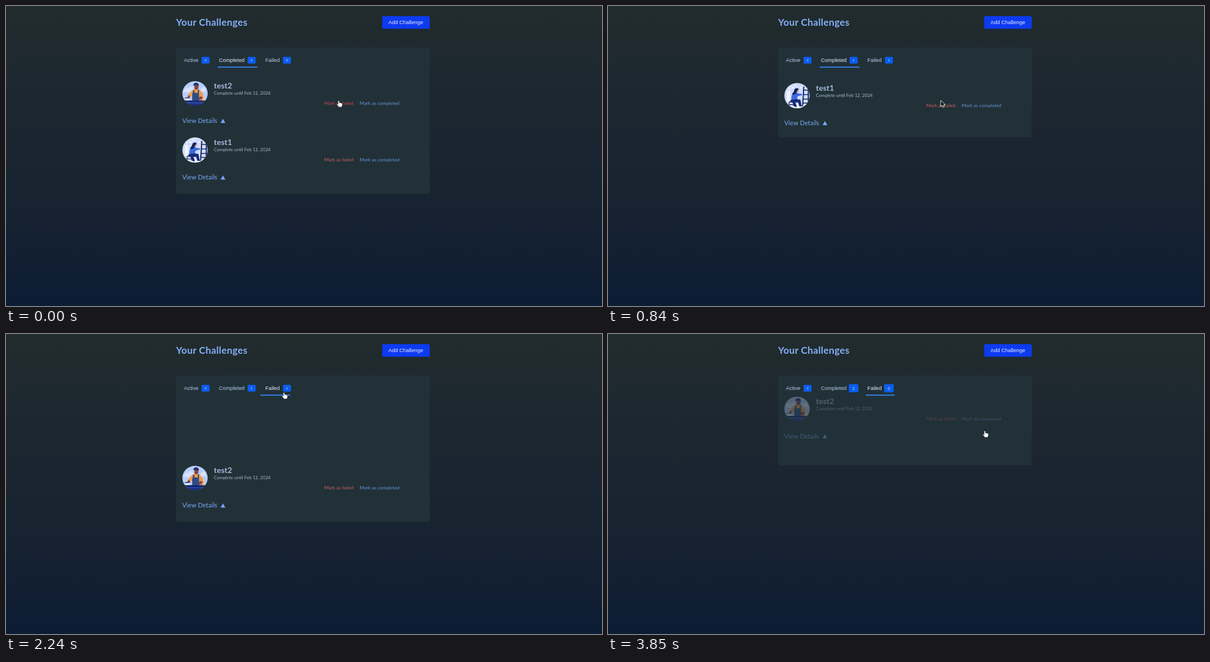
An HTML page that plays this animation: 1055 px wide and 531 px high, repeating every 3.92 s.

```html
<!DOCTYPE html>
<html lang="en">
<head>
<meta charset="utf-8">
<title>Challenges</title>
<style>
  html, body { margin: 0; width: 100%; height: 100%; overflow: hidden; background: #182331; }
  svg { display: block; width: 100vw; height: 100vh; }
  text { font-family: Lato, sans-serif; }
  .ui { font-family: "Liberation Sans", Arial, sans-serif; font-size: 9.4px; fill: #b7cdf0; }
  .num { font-family: "Liberation Sans", Arial, sans-serif; font-size: 6.2px; fill: #cfe0ff; text-anchor: middle; }
  .title { font-size: 17px; font-weight: 700; letter-spacing: .4px; fill: #84b0f8; }
  .name { font-size: 14.06px; font-weight: 700; fill: #a5bad9; }
  .date { font-size: 8px; fill: #a9bace; }
  .link { font-size: 8.44px; }
  .more { font-size: 11.25px; fill: #79a7f8; }
</style>
</head>
<body>
<svg viewBox="0 0 1055 531" preserveAspectRatio="none">
  <defs>
    <linearGradient id="sky" x1="0" y1="0" x2="0" y2="1">
      <stop offset="0" stop-color="#222c2d"/>
      <stop offset=".3" stop-color="#1c2731"/>
      <stop offset=".65" stop-color="#182331"/>
      <stop offset="1" stop-color="#0c1c34"/>
    </linearGradient>
    <clipPath id="disc"><circle r="22.4"/></clipPath>
    <clipPath id="dish"><path d="M-22.4 0A22.4 21.6 0 0 1 22.4 0A22.4 21.4 0 0 1 -22.4 0Z"/></clipPath>

    <g id="cook" clip-path="url(#dish)">
      <rect x="-23" y="-23" width="46" height="46" fill="#b9cef8"/>
      <path d="M-20 -5q3 -6 8 -4q4 -6 9 -1v8h-17zM10 -8q4 -5 9 -1v6h-9z" fill="#d6e3fd"/>
      <path d="M-5 -6Q2 -9 8 -6Q13 -3 15 5L14 11H-5L-6 4L-10 7L-13 4Z" fill="#f29a45"/>
      <path d="M-11 3L-8 6L-13 11L-16 9Z" fill="#8a4538"/>
      <path d="M9 5L14 7L10 12L4 11Z" fill="#8a4538"/>
      <path d="M-3 -6H-1V-1H5V-7H7V13H-5V2Z" fill="#2d4c8b"/>
      <path d="M-1 -8V-14H6V-9Q3 -5 -1 -8Z" fill="#864237"/>
      <path d="M-3 -14Q-3 -19 2 -19Q7 -19 7 -13L5 -14Z" fill="#20336f"/>
      <path d="M-18 7H-8Q-9 13 -13 13Q-17 13 -18 7Z" fill="#e9f0ff"/>
      <path d="M-18 8H-9" stroke="#263b82" stroke-width="1.6"/>
      <path d="M-23 12.5H23V16H-23Z" fill="#17246b"/>
      <path d="M-23 16H23V22H-23Z" fill="#2448a6"/>
      <path d="M-23 18H23V22H-23Z" fill="#1a2c7c"/>
      <circle cx="11" cy="11" r="1.8" fill="#e6604f"/>
      <circle cx="15" cy="11" r="1.6" fill="#f2c45b"/>
    </g>

    <g id="painter" clip-path="url(#disc)">
      <rect x="-23" y="-23" width="46" height="46" fill="#cfddfc"/>
      <path d="M-18 -9H-12V10H-18ZM-23 15H23V23H-23Z" fill="#f1f5ff"/>
      <g fill="#fff">
        <circle cx="-8" cy="-14" r="1.8"/><circle cx="-3" cy="-18" r="1.2"/>
        <circle cx="7" cy="-14" r="1.3"/><circle cx="-14" cy="-13" r="1.2"/>
      </g>
      <g stroke="#14235d" fill="none">
        <path d="M12 -16L10 18M20 -18L20 18" stroke-width="2"/>
        <path d="M11 -10H21M11 -2H21M10 6H21M10 13H21" stroke-width="1.5"/>
        <path d="M-13 10L-16 21M-4 10L-2 21M-14 16H-3" stroke-width="1.4"/>
      </g>
      <path d="M-7 -5Q-2 -9 2 -4L9 -3V-1L1 1L0 9H-10Q-11 1 -7 -5Z" fill="#3f6add"/>
      <path d="M-12 8Q-3 5 6 7L8 17L11 19H4L2 12L-3 12L0 19H-6L-8 12H-12Z" fill="#192b78"/>
      <circle cx="1" cy="-9" r="3.2" fill="#e5b9ae"/>
      <path d="M3 -12Q0 -15 -4 -12Q-5 -7 -9 -3Q-5 0 -2 -4Q0 -8 3 -12Z" fill="#14235d"/>
    </g>
  </defs>

  <rect width="1055" height="531" fill="url(#sky)"/>
  <text class="title" x="301" y="35">Your Challenges</text>
  <rect x="666" y="18" width="84" height="22.3" rx="2" fill="#0c3bf0"/>
  <text class="ui" x="677" y="32.2" style="fill:#e8eeff">Add Challenge</text>

  <rect id="panel" x="301" y="73" width="449" height="259.5" rx="4" fill="#213137"/>
  <g id="tabs"></g>
  <rect id="bar" y="107.2" height="2" fill="#367fe6"/>
  <g id="cards"></g>

  <g id="arrow" stroke="#fff" stroke-width=".9" stroke-linejoin="round">
    <path d="M0 0V11.2L2.6 8.8L4.3 12.5L6.2 11.7L4.6 8H8Z" fill="#080a0c"/>
  </g>
  <g id="hand" stroke="#15191c" stroke-width=".7" stroke-linejoin="round">
    <path d="M-1.2 .9Q0 -.6 1.2 .9V4.3Q2.4 3.4 3.2 4.6Q4.4 3.9 5 5.2Q6.4 4.8 6.5 6.4V8.2Q6.4 9.8 5.5 10.6V12H-.6V11L-3.4 7.4Q-4 5.9 -2.5 6.1L-1.2 7.2Z" fill="#fff"/>
  </g>
</svg>

<script>
const LOOP = 3920, STEP = 70, UNIT = 0.7033, ROW = 100.2;
const $ = id => document.getElementById(id);
const clamp = v => Math.max(0, Math.min(1, v));
const mix = (a, b, k) => a + (b - a) * k;

// Cubic bezier easing, solved by bisection.
function bezier(x1, y1, x2, y2) {
  const at = (a, b, u) => 3 * (1 - u) * (1 - u) * u * a + 3 * (1 - u) * u * u * b + u * u * u;
  return x => {
    if (x <= 0) return 0;
    if (x >= 1) return 1;
    let lo = 0, hi = 1;
    for (let i = 0; i < 24; i++) {
      const mid = (lo + hi) / 2;
      if (at(x1, x2, mid) < x) lo = mid; else hi = mid;
    }
    return at(y1, y2, lo);
  };
}
const shiftEase = bezier(.4, 0, .1, 1);
const fadeEase = bezier(.25, .1, .35, 1);

// Underdamped spring, stiffness 500 and damping 25.
function spring(ms) {
  if (ms <= 0) return 0;
  const s = ms / 1000, w = Math.sqrt(500 - 12.5 * 12.5);
  return 1 - Math.exp(-12.5 * s) * (Math.cos(w * s) + 12.5 / w * Math.sin(w * s));
}
const fade = ms => fadeEase(ms / 300);
const shift = ms => shiftEase(ms / 450);
const lift = -30 * UNIT;

const LEAVE1 = 150, DROP1 = 514;
const SWITCH = 1952, DROP2 = 2293;
const LEAVE3 = 3722;
const COUNT1 = 60, COUNT2 = 3632;

const tabs = [["Active", 315, 353.2], ["Completed", 377, 434.8], ["Failed", 459, 497.3]];
$("tabs").innerHTML = tabs.map(([label, x, cx]) => `
  <text class="ui" x="${x}" y="99.3">${label}</text>
  <g data-x="${cx}">
    <rect x="-7.1" y="-6.1" width="14.2" height="12.2" rx="2" fill="#0b5df0"/>
    <text class="num" y="2.2"></text>
  </g>`).join("");
const labels = [...document.querySelectorAll("#tabs > text")];
const badges = [...document.querySelectorAll("#tabs > g")];

const card = (id, name, art) => `
  <g id="${id}">
    <use href="#${art}" x="334.6" y="154.7"/>
    <text class="name" x="368" y="145.8">${name}</text>
    <text class="date" x="368" y="156.8">Complete until Feb 12, 2024</text>
    <text class="link" x="563.4" y="174.7" fill="#c9605f">Mark as failed</text>
    <text class="link" x="626" y="174.7" fill="#6a95dc">Mark as completed</text>
    <text class="more" x="312" y="206.9">View Details</text>
    <path d="M379.8 207L384 199.6L388.2 207Z" fill="#76a6f8"/>
  </g>`;
$("cards").innerHTML = card("one", "test1", "painter") + card("two", "test2", "cook");
const failLink = $("two").querySelector(".link");

function place(id, y, opacity) {
  $(id).setAttribute("transform", `translate(0 ${y.toFixed(2)})`);
  $(id).setAttribute("opacity", clamp(opacity).toFixed(3));
}

function drawCards(t) {
  if (t < SWITCH) {
    place("one", ROW * (1 - shift(t - DROP1)), 1);
    place("two", lift * spring(t - LEAVE1), 1 - fade(t - LEAVE1));
  } else {
    const since = t - SWITCH;
    place("one", lift * spring(since), 1 - fade(since));
    const y = ROW * (1 - shift(t - DROP2)) + lift * (1 - spring(since)) + lift * spring(t - LEAVE3);
    place("two", y, t < LEAVE3 ? fade(since) : 1 - fade(t - LEAVE3));
  }
  failLink.setAttribute("fill", t < LEAVE1 + 100 ? "#d0444a" : "#c9605f");
  const tall = t < DROP1 || (t >= SWITCH && t < DROP2);
  $("panel").setAttribute("height", tall ? 259.5 : 159.5);
}

function drawTabs(t) {
  const changed = t >= COUNT1 && t < COUNT2;
  const counts = changed ? [0, 1, 1] : [0, 2, 0];
  const k = clamp((t - (t < COUNT2 ? COUNT1 : COUNT2)) / 400);
  const pulse = 1 + .2 * Math.sin(Math.PI * k) ** 2;
  const active = t < SWITCH ? 1 : 2;
  badges.forEach((b, i) => {
    b.setAttribute("transform", `translate(${b.dataset.x} 96) scale(${i ? pulse : 1})`);
    b.lastElementChild.textContent = counts[i];
    labels[i].style.fill = i === active ? "#e6effd" : "#b7cdf0";
  });
  const s = shift(t - SWITCH);
  $("bar").setAttribute("x", mix(374.7, 456.5, s));
  $("bar").setAttribute("width", mix(70.3, 51, s));
}

const path = [
  [0, 589, 167], [1260, 589, 167], [1400, 572, 157], [1540, 511, 120], [1680, 494, 90],
  [1820, 491, 83], [1950, 491, 83], [2240, 492, 103], [2310, 494, 105], [2450, 612, 150],
  [2590, 659, 170], [2730, 665, 172], [2940, 667, 172], [3290, 667, 172],
  [3360, 667.4, 171.2], [3430, 667.4, 171.2], [3500, 667, 171], [LOOP, 667, 171]
];

function drawPointer(t) {
  let i = 0;
  while (t >= path[i + 1][0]) i++;
  const [t0, x0, y0] = path[i], [t1, x1, y1] = path[i + 1];
  const k = (t - t0) / (t1 - t0);
  const hand = t < 260 || (t > 1640 && t < 2330) || t > 2650;
  const at = `translate(${mix(x0, x1, k)} ${mix(y0, y1, k)})`;
  for (const [id, on] of [["hand", hand], ["arrow", !hand]]) {
    $(id).setAttribute("transform", at);
    $(id).setAttribute("visibility", on ? "visible" : "hidden");
  }
}

function draw(ms) {
  const t = Math.floor(((ms + 2) % LOOP) / STEP) * STEP;
  drawCards(t);
  drawTabs(t);
  drawPointer(t);
}

const start = performance.now();
function tick() {
  draw(performance.now() - start);
  requestAnimationFrame(tick);
}
tick();
</script>
</body>
</html>
```
